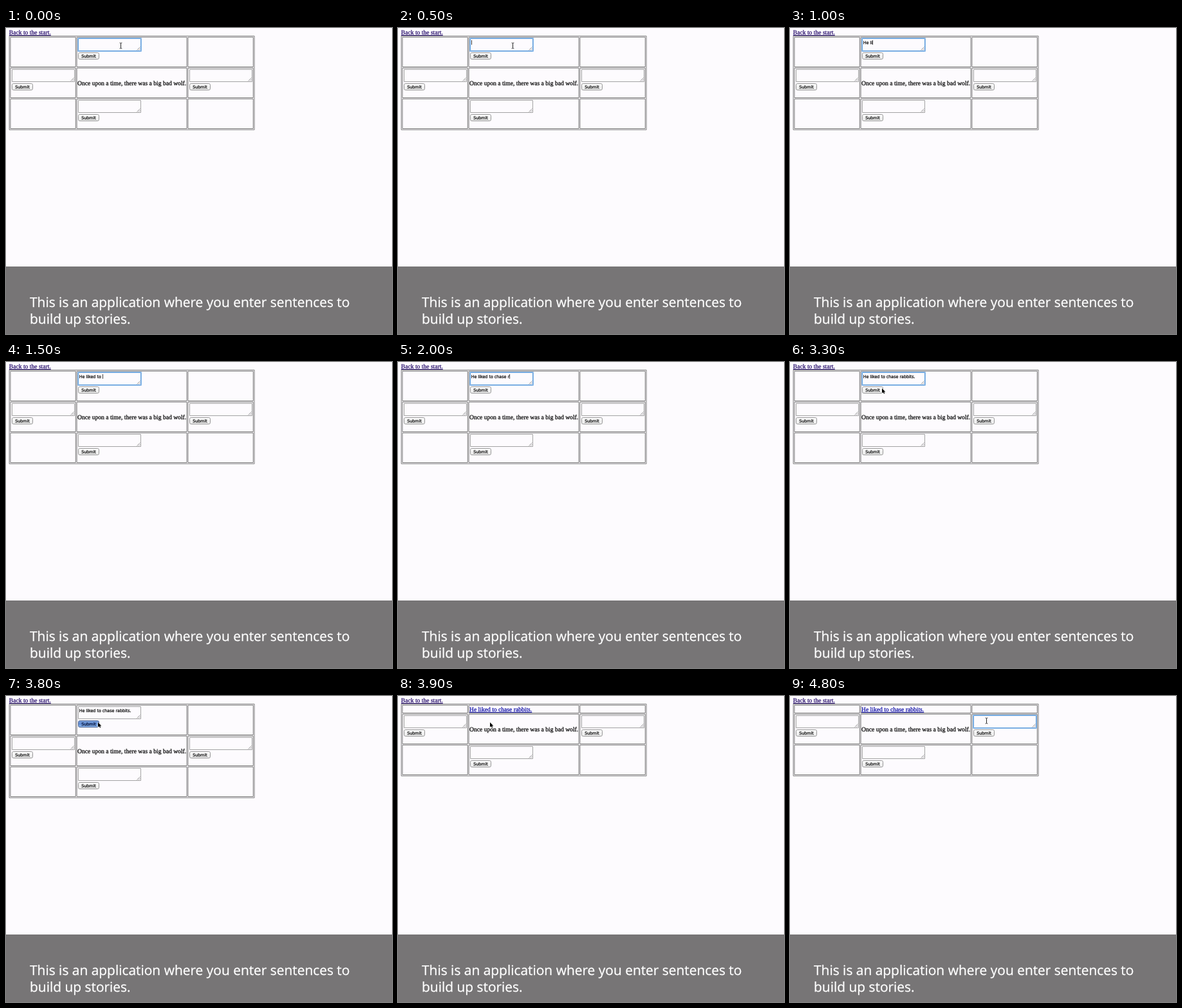
An HTML page with a canvas that plays this animation: 600 px wide and 476 px high, repeating every 5 s.

```html
<!DOCTYPE html>
<html lang="en">
<head>
<meta charset="utf-8">
<title>Story builder</title>
<style>
  html, body { margin: 0; width: 100%; height: 100%; overflow: hidden; background: #fdfbfe; }
  canvas { display: block; }
</style>
</head>
<body>
<canvas id="stage" width="600" height="476"></canvas>
<script>
const g = document.getElementById('stage').getContext('2d');
const SERIF = '9.6px "Liberation Serif", Times, serif';
const SANS = '6.35px "DejaVu Sans", sans-serif';
const CAPTION = '20.92px "Open Sans", sans-serif';
const PAGE = '#fdfbfe';
const LOOP = 5000, STEP = 100;
const SENTENCE = 'He liked to chase rabbits.';
const COLS = [[6.9, 108.3], [110.1, 281.1], [282.9, 384.3]];

// Keyframes: [time, value, value...]
const TYPED = [[600, 0], [1000, 5], [2000, 19], [2100, 19], [2700, 25], [2800, 26]];
const POINTER = [[0, 178, 27], [2800, 178, 27], [3300, 143, 41], [4000, 143, 41], [4400, 305, 38]];

function at(keys, t) {
  const i = keys.findIndex(k => k[0] > t);
  if (i < 0) return keys[keys.length - 1].slice(1);
  const a = keys[Math.max(i - 1, 0)], b = keys[i];
  const p = Math.max(0, (t - a[0]) / (b[0] - a[0] || 1));
  return a.slice(1).map((v, n) => v + (b[n + 1] - v) * p);
}

// A hairline stroke gives the slightly heavy look of screen text.
function text(str, x, y, font, color) {
  g.font = font;
  g.fillStyle = g.strokeStyle = color;
  g.lineWidth = 0.28;
  g.fillText(str, x, y);
  g.strokeText(str, x, y);
  return g.measureText(str).width;
}

function link(str, x, y, color) {
  const w = text(str, x, y, SERIF, color);
  g.fillRect(x, y + 1.1, w, 1);
}

function box(x, y, w, h, color) {
  g.lineWidth = 1;
  g.strokeStyle = color;
  g.strokeRect(x, y, w, h);
}

function field(x, y, focused, str = '', caret = false) {
  g.fillStyle = PAGE;
  g.fillRect(x, y, 98, 20);
  if (focused) {
    box(x - 0.5, y - 0.5, 99, 21, '#93beea');
    box(x + 0.5, y + 0.5, 97, 19, '#5f9ddb');
  } else {
    box(x + 0.5, y + 0.5, 97, 19, '#a3a3a3');
  }
  g.strokeStyle = '#777';
  g.lineWidth = 0.7;
  g.beginPath();
  for (const d of [2.5, 5]) {
    g.moveTo(x + 96.5 - d, y + 18.5);
    g.lineTo(x + 96.5, y + 18.5 - d);
  }
  g.stroke();
  const w = text(str, x + 1.8, y + 8.5, SANS, '#111');
  if (caret) g.fillRect(x + 2 + w, y + 3, 0.8, 7);
}

function button(x, y, pressed) {
  const fill = g.createLinearGradient(0, y, 0, y + 10);
  fill.addColorStop(0, pressed ? '#86a9df' : '#fff');
  fill.addColorStop(0.5, pressed ? '#5c89d2' : '#f3f3f3');
  fill.addColorStop(1, pressed ? '#8bb4ea' : '#ececec');
  g.fillStyle = fill;
  g.strokeStyle = pressed ? '#3d5688' : '#8c8c8c';
  g.lineWidth = 0.9;
  g.beginPath();
  g.roundRect(x + 0.5, y + 0.5, 32, 10, 2.2);
  g.fill();
  g.stroke();
  text('Submit', x + 5.2, y + 7.8, SANS, pressed ? '#0b1538' : '#111');
}

function form(x, y, o = {}) {
  field(x, y, o.focused, o.str, o.caret);
  button(x, y + 22, o.pressed);
}

function arrow(x, y) {
  g.beginPath();
  [[0, 0], [0, 7.6], [1.8, 6], [3, 8.6], [4.2, 8], [3.1, 5.6], [5.4, 5.4]]
    .forEach(([dx, dy]) => g.lineTo(x + dx, y + dy));
  g.closePath();
  g.strokeStyle = '#fff';
  g.lineWidth = 1;
  g.stroke();
  g.fillStyle = '#000';
  g.fill();
}

function beam(x, y) {
  g.strokeStyle = '#222';
  g.lineWidth = 0.9;
  g.beginPath();
  for (const side of [-1.8, 1.8]) {
    g.moveTo(x + 0.5 + side, y - 4);
    g.quadraticCurveTo(x + 0.5, y - 4, x + 0.5, y - 2.5);
    g.lineTo(x + 0.5, y + 3.5);
    g.quadraticCurveTo(x + 0.5, y + 5, x + 0.5 + side, y + 5);
  }
  g.stroke();
}

function table(shift) {
  box(5.1, 12.5, 381, 145.8 - shift, '#808080');
  const rows = [[14.3, 60.5 - shift], [62.3 - shift, 108.5 - shift], [110.3 - shift, 156.5 - shift]];
  for (const [top, bottom] of rows)
    for (const [left, right] of COLS) box(left, top, right - left, bottom - top, '#7a7a7a');
}

function draw(t) {
  const sent = t >= 3900, pressed = t >= 3700 && !sent;
  const shift = sent ? 34 : 0;
  const count = Math.floor(at(TYPED, t)[0] + 1e-6);

  g.fillStyle = PAGE;
  g.fillRect(0, 0, 600, 476);
  link('Back to the start.', 4.8, 9.9, '#2c1470');
  table(shift);

  if (sent) {
    link(SENTENCE, 111, 23.8, '#1414a8');
  } else {
    form(112, 16, {
      focused: !pressed, pressed,
      str: SENTENCE.slice(0, count),
      caret: !pressed && t >= 300 && t < 3300
    });
  }
  form(9, 64 - shift);
  form(285, 64 - shift, { focused: t >= 4300, caret: t >= 4300 && t < 4800 });
  form(112, 112 - shift);
  text('Once upon a time, there was a big bad wolf.', 111, 88.5 - shift, SERIF, '#0a0a0a');

  g.fillStyle = '#777576';
  g.fillRect(0, 371, 600, 105);
  text('This is an application where you enter sentences to', 37, 434, CAPTION, '#fff');
  text('build up stories.', 37, 459.5, CAPTION, '#fff');

  // The pointer hides while keys are being pressed.
  if (t < 700 || t >= 2900) {
    const [x, y] = at(POINTER, t);
    const overField = sent ? x > 285 : y < 36;
    (overField ? beam : arrow)(x, y);
  }
}

g.textRendering = 'geometricPrecision';
g.lineJoin = 'round';
const start = performance.now();
function tick() {
  const t = (performance.now() - start) % LOOP;
  draw(Math.floor(t / STEP) * STEP);
  requestAnimationFrame(tick);
}
tick();
</script>
</body>
</html>
```
